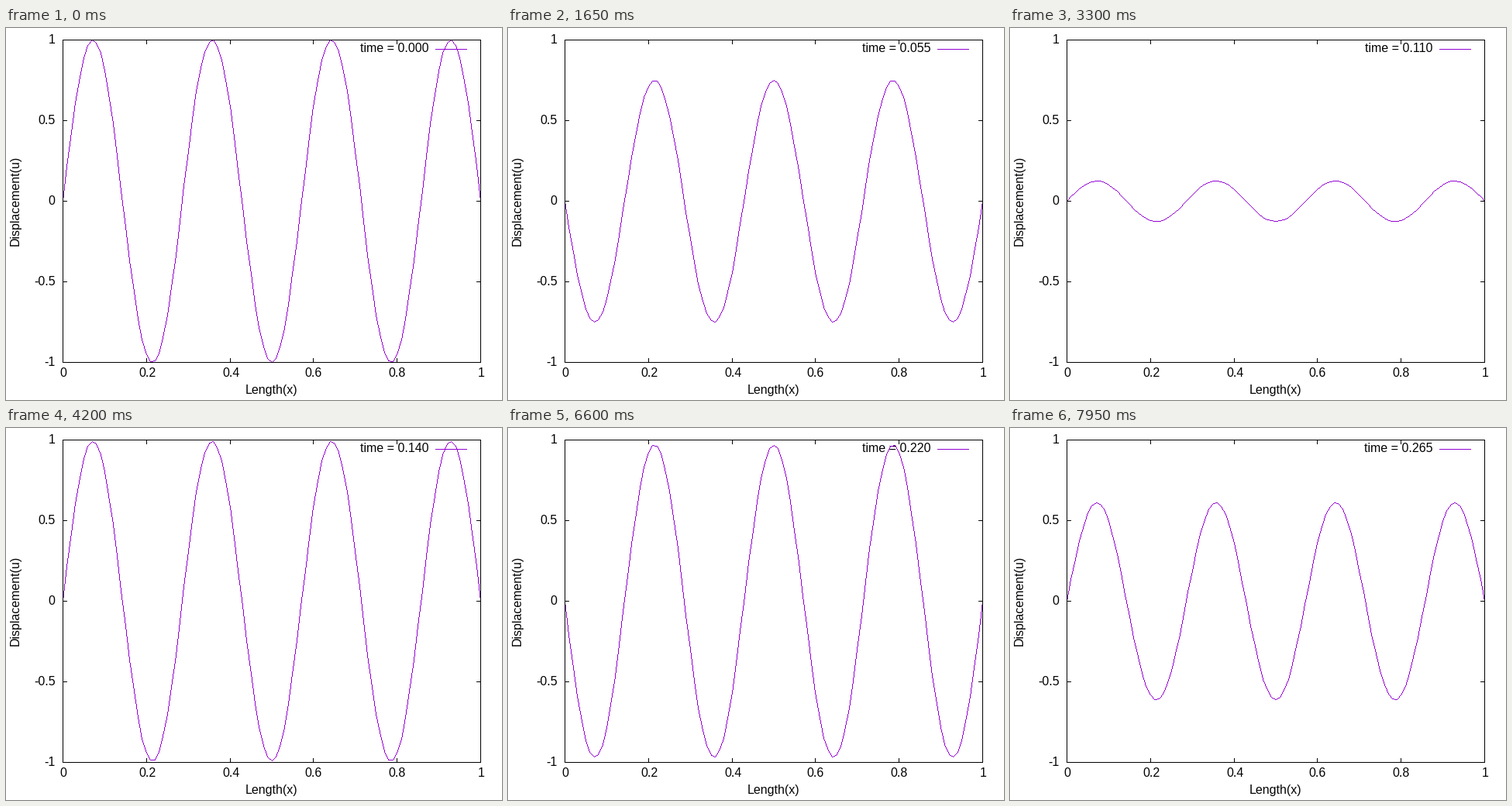
A matplotlib script that plays this animation: 640x480 px, repeating every 8000 ms.

```python
import numpy as np
import matplotlib.pyplot as plt
from matplotlib.animation import FuncAnimation

WIDTH, HEIGHT, DPI = 640, 480, 80
LEFT, RIGHT, TOP, BOTTOM = 73, 612, 15, 431
TICK = 5
INTERVAL, FRAMES, HOLD = 50, 160, 3
TIME_STEP = 0.005
WAVE = 7 * np.pi
SPEED = 2
BLACK = (0, 0, 0, 255)
PURPLE = (148, 0, 211, 255)

plt.rcParams.update({
    "font.family": "Liberation Sans",
    "font.size": 16 * 72 / DPI,
    "text.hinting": "default",
})

fig = plt.figure(figsize=(WIDTH / DPI, HEIGHT / DPI), dpi=DPI, facecolor="white")
ax = fig.add_axes([0, 0, 1, 1])
ax.axis("off")


def to_x(x):
    return np.floor(LEFT + (RIGHT - LEFT) * x + 0.5).astype(int)


def to_y(u):
    return np.floor(BOTTOM - (BOTTOM - TOP) * (u + 1) / 2 + 0.5).astype(int)


def stroke(canvas, xs, ys, color=BLACK):
    """Draw a hard-edged polyline, one pixel wide."""
    for x0, y0, x1, y1 in zip(xs[:-1], ys[:-1], xs[1:], ys[1:]):
        steps = max(abs(x1 - x0), abs(y1 - y0))
        along = np.linspace(0, 1, steps + 1)
        cols = np.floor(x0 + (x1 - x0) * along + 0.5).astype(int)
        rows = np.floor(y0 + (y1 - y0) * along + 0.5).astype(int)
        canvas[rows, cols] = color


def label(x, y, text, ha="center", **kwargs):
    return ax.text(x, y, text, ha=ha, va="baseline", color="black",
                   zorder=1, **kwargs)


def draw_frame(canvas):
    stroke(canvas, [LEFT, RIGHT, RIGHT, LEFT, LEFT],
           [TOP, TOP, BOTTOM, BOTTOM, TOP])
    for x in to_x(x_ticks):
        stroke(canvas, [x, x], [BOTTOM, BOTTOM - TICK])
        stroke(canvas, [x, x], [TOP, TOP + TICK])
    for y in to_y(y_ticks):
        stroke(canvas, [LEFT, LEFT + TICK], [y, y])
        stroke(canvas, [RIGHT, RIGHT - TICK], [y, y])


x_ticks = np.array([0, 0.2, 0.4, 0.6, 0.8, 1])
y_ticks = np.array([-1, -0.5, 0, 0.5, 1])
for value in x_ticks:
    label(to_x(value) + 0.5, 449.5, f"{value:g}")
for value in y_ticks:
    label(63, to_y(value) + 4.5, f"{value:g}", ha="right")
label(341.5, 471.5, "Length(x)")
label(16.5, 222, "Displacement(u)", rotation=90, rotation_mode="anchor")
clock = label(545, 30.5, "", ha="right")

grid = np.linspace(0, 1, 101)
columns = to_x(grid)
shape = np.sin(WAVE * grid)
blank = np.zeros((HEIGHT, WIDTH, 4), dtype=np.uint8)
picture = ax.imshow(blank, interpolation="nearest", aspect="auto", zorder=2)


def update(frame):
    time = frame // HOLD * TIME_STEP
    canvas = blank.copy()
    stroke(canvas, [554, 594], [27, 27], PURPLE)
    stroke(canvas, columns, to_y(shape * np.cos(SPEED * WAVE * time)), PURPLE)
    draw_frame(canvas)
    picture.set_data(canvas)
    clock.set_text(f"time = {time:.3f}")
    return picture, clock


anim = FuncAnimation(fig, update, frames=FRAMES, interval=INTERVAL,
                     repeat=True, repeat_delay=0, blit=False)
plt.show()
```
